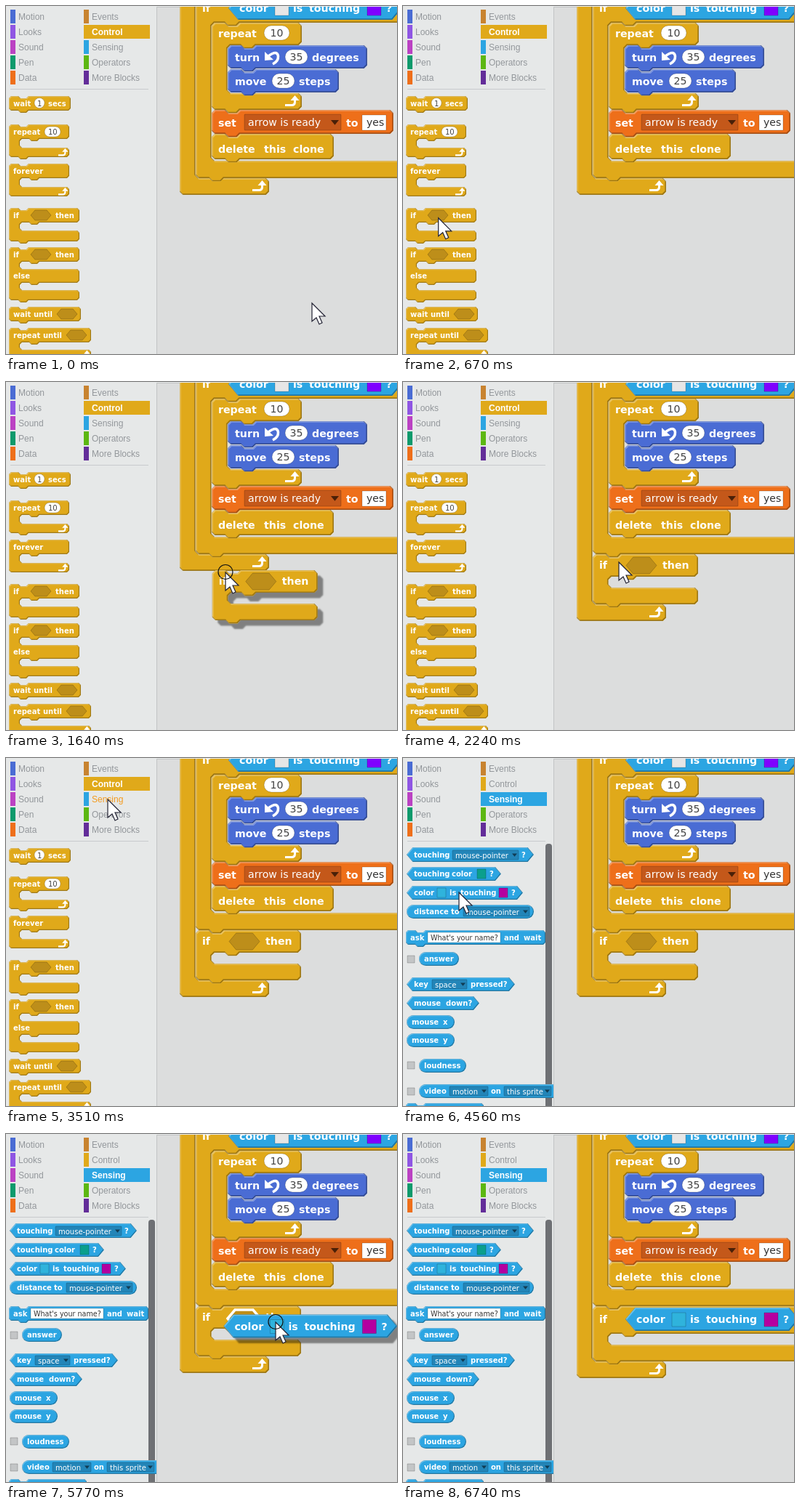
Write an HTML page with a canvas that moves like this. It is 538 px wide and 479 px high and loops after 7790 ms.

```html
<!DOCTYPE html>
<html lang="en">
<head>
<meta charset="utf-8">
<title>Block editor</title>
<style>
html, body { margin: 0; width: 100%; height: 100%; overflow: hidden; background: #e6e8e8; }
canvas { display: block; }
</style>
</head>
<body>
<canvas width="538" height="479"></canvas>
<script>
const ctx = document.querySelector('canvas').getContext('2d');
const LOOP = 7790, BIG = 1.44, DRAG_LAG = 60;
const CONTROL = '#e0a91a', SENSING = '#2ca5e2', MOTION = '#4a6cd4', DATA = '#ee6f1a';
const SLOT = '#bd8e1a', MENU = '#2385b8';

// Screen updates: [first, last, count]
const updates = [[0, 0, 1], [100, 790, 7], [910, 1640, 7], [1760, 2000, 3], [2240, 2240, 1], [2700, 3400, 7],
  [3510, 4230, 7], [4330, 4560, 3], [4810, 5530, 7], [5770, 6500, 7], [6620, 6740, 2]];
const ticks = updates.flatMap(([a, b, n]) =>
  Array.from({ length: n }, (_, i) => Math.floor((a + (b - a) * i / Math.max(1, n - 1)) / 10) * 10));

// Pointer path: [time, x, y, ease-out power on arrival (0 = smooth both ends)]
const path = [[0, 421, 409, 0], [790, 24, 284, 0], [910, 24, 284, 1], [1150, 184, 296, 1], [1640, 302, 262, 3],
  [2000, 296, 253, 0], [2240, 297, 248, 0], [2580, 297, 248, 1], [3400, 139, 56, 0], [3510, 140, 57, 1],
  [3750, 140, 57, 1], [4230, 86, 155, 0], [4560, 77, 185, 2], [4690, 77, 185, 1], [5530, 378, 267, 1.3],
  [5770, 371, 259, 2], [5890, 371, 259, 1], [6500, 412, 405, 0], [6620, 466, 451, 1]];

function pointer(t) {
  const i = path.findIndex(k => k[0] > t);
  if (i < 0) return path.at(-1).slice(1, 3);
  const [t0, x0, y0] = path[i - 1], [t1, x1, y1, power] = path[i];
  const u = (t - t0) / (t1 - t0);
  const e = power ? 1 - (1 - u) ** power : u * u * (3 - 2 * u);
  return [x0 + (x1 - x0) * e, y0 + (y1 - y0) * e];
}

function text(str, x, y, size, color = '#fff', weight = 'bold', family = '"DejaVu Sans", sans-serif') {
  ctx.font = `${weight} ${size}px ${family}`;
  ctx.fillStyle = color;
  ctx.fillText(str, x, y);
}

// Alternating words and x positions on one baseline
function words(y, s, ...list) {
  for (let i = 0; i < list.length; i += 2) text(list[i], list[i + 1], y, s === 1 ? 10 : 14.2);
}

function polygon(points) {
  const p = new Path2D();
  points.forEach(([x, y]) => p.lineTo(x, y));
  p.closePath();
  return p;
}

function round(x, y, w, h, r) {
  const p = new Path2D();
  p.roundRect(x, y, w, h, r);
  return p;
}

function hex(x, y, w, h) {
  const k = h * .42, m = y + h / 2;
  return polygon([[x, m], [x + k, y], [x + w - k, y], [x + w, m], [x + w - k, y + h], [x + k, y + h]]);
}

// Command block outline; each mouth is [top, bottom] below y
function stack(x, y, w, h, s = 1, mouths = [], armW = w, flat = false) {
  const c = 3 * s;
  const notch = (nx, ny) => [[13, 0], [16, 3], [24, 3], [27, 0]].map(([a, b]) => [nx + a * s, ny + b * s]);
  const pts = [[x, y + c], [x + c, y], ...notch(x, y)];
  let right = x + w;
  pts.push([right - c, y], [right, y + c]);
  for (const [a, b] of mouths) {
    const inner = x + 15 * s;
    pts.push([right, y + a - c], [right - c, y + a], ...notch(inner, y + a).reverse(),
      [inner + c, y + a], [inner, y + a + c], [inner, y + b - c], [inner + c, y + b]);
    right = x + armW;
    pts.push([right - c, y + b], [right, y + b + c]);
  }
  pts.push([right, y + h - c], [right - c, y + h]);
  if (!flat) pts.push(...notch(x, y + h).reverse());
  pts.push([x + c, y + h], [x, y + h - c]);
  return polygon(pts);
}

function block(shape, color, s = 1, lifted = false) {
  ctx.save();
  ctx.fillStyle = color;
  if (lifted) {
    ctx.shadowColor = 'rgba(0,0,0,.42)';
    ctx.shadowOffsetX = ctx.shadowOffsetY = 7.5;
    ctx.shadowBlur = 2;
  }
  ctx.fill(shape);
  ctx.shadowColor = 'transparent';
  ctx.clip(shape);
  ctx.lineWidth = 1.3 * s;
  for (const [d, tint] of [[.5, 'rgba(255,255,255,.3)'], [-.5, 'rgba(0,0,0,.3)']]) {
    ctx.save();
    ctx.translate(d * s, d * s);
    ctx.strokeStyle = tint;
    ctx.stroke(shape);
    ctx.restore();
  }
  ctx.restore();
}

function inset(shape, color) {
  ctx.fillStyle = color;
  ctx.fill(shape);
  ctx.strokeStyle = 'rgba(0,0,0,.2)';
  ctx.lineWidth = 1;
  ctx.stroke(shape);
}

function number(str, x, y, w, h, tx, ty, size) {
  inset(round(x, y, w, h, h / 2), '#fff');
  text(str, tx, ty, size, '#444', 'normal');
}

function triangle(x, y, w, color) {
  ctx.fillStyle = color;
  ctx.fill(polygon([[x, y], [x + w, y], [x + w / 2, y + w * .62]]));
}

function menu(str, x, y, w) {
  inset(round(x, y, w, 13, 1), MENU);
  text(str, x + 4, y + 10.5, 10, '#fff', 'normal');
  triangle(x + w - 9, y + 4.5, 7, '#103c54');
}

function loopArrow(x, y, s) {
  ctx.save();
  ctx.translate(x, y);
  ctx.scale(s / BIG, s / BIG);
  ctx.strokeStyle = ctx.fillStyle = '#fff';
  ctx.lineWidth = 3;
  ctx.stroke(new Path2D('M0 13.5H9Q13.5 13.5 13.5 9V6'));
  ctx.fill(new Path2D('M7.5 7L13.5 0L19.5 7Z'));
  ctx.restore();
}

function categories(selected, [mx, my]) {
  const names = ['Motion', 'Looks', 'Sound', 'Pen', 'Data', 'Events', 'Control', 'Sensing', 'Operators', 'More Blocks'];
  const colors = [MOTION, '#8f56e3', '#bb42c3', '#0e9a6c', DATA, '#c88330', CONTROL, SENSING, '#5cb712', '#632d99'];
  names.forEach((name, i) => {
    const x = i < 5 ? 6 : 107, y = 5 + i % 5 * 21, on = name === selected;
    const hover = mx >= x && mx < x + 91 && my >= y && my < y + 20;
    ctx.fillStyle = colors[i];
    ctx.fillRect(x, y, on ? 91 : 7, 19);
    text(name, x + 11, y + 14, 12, on ? '#fff' : hover ? '#f39a1e' : '#93979b', on ? 'bold' : 'normal',
      '"Liberation Sans", Arial, sans-serif');
  });
  ctx.fillStyle = '#c8cbcd';
  ctx.fillRect(6, 114, 190, 1);
}

function controlPalette() {
  const slot = (x, y) => inset(hex(x, y, 28, 14), SLOT);
  const put = (...args) => block(stack(4, ...args), CONTROL);
  put(124, 85, 20);
  words(138, 1, 'wait', 10, 'secs', 58);
  number('1', 39, 126.5, 14, 14, 43, 138, 10);
  put(163, 83, 45, 1, [[20, 32]]);
  words(177, 1, 'repeat', 10);
  number('10', 53, 166, 22, 14, 58, 177, 10);
  loopArrow(72, 196, 1);
  put(217, 83, 45, 1, [[20, 32]], 83, true);
  words(231, 1, 'forever', 10);
  loopArrow(72, 250, 1);
  put(278, 97, 46, 1, [[20, 31]]);
  words(292, 1, 'if', 10, 'then', 68);
  slot(34, 281);
  put(332, 97, 73, 1, [[20, 30], [49, 59]]);
  words(346, 1, 'if', 10, 'then', 68);
  words(375, 1, 'else', 10);
  slot(34, 335);
  put(414, 99, 20);
  words(428, 1, 'wait', 10, 'until', 38);
  slot(70, 417);
  put(443, 113, 45, 1, [[20, 30]]);
  words(457, 1, 'repeat', 10, 'until', 51);
  slot(83, 446);
  loopArrow(102, 474, 1);
}

function sensingPalette() {
  const put = shape => block(shape, SENSING);
  const pill = (x, y, w) => put(round(x, y, w, 19, 9.5));
  const swatch = (x, y, color) => inset(round(x, y, 12, 13, 0), color);
  const check = y => inset(round(6, y, 10, 10, 0), '#c3c5c6');
  ctx.fillStyle = '#6e7074';
  ctx.fill(round(196, 118, 9, 380, 4));

  put(hex(5, 123, 175, 20));
  words(137, 1, 'touching', 15, '?', 163);
  menu('mouse-pointer', 68, 127, 91);
  put(hex(5, 150, 130, 19));
  words(163, 1, 'touching', 15, 'color', 67, '?', 119);
  swatch(102, 153, '#0b9f8c');
  put(hex(5, 176, 160, 19));
  words(189, 1, 'color', 15, 'is', 64, 'touching', 79, '?', 149);
  swatch(47, 179, '#2fb3dc');
  swatch(132, 179, '#b400a0');
  pill(5, 202, 175);
  words(215, 1, 'distance', 15, 'to', 66);
  menu('mouse-pointer', 83, 205, 91);
  put(stack(4, 237, 192, 20));
  words(251, 1, 'ask', 10, 'and', 139, 'wait', 166);
  inset(round(34, 240, 100, 14, 0), '#fff');
  text("What's your name?", 38, 251, 9.6, '#333', 'normal');
  check(272);
  pill(22, 267, 55);
  words(280, 1, 'answer', 29);
  put(hex(5, 302, 149, 19));
  words(315, 1, 'key', 15, 'pressed?', 93);
  menu('space', 40, 305, 48);
  put(hex(5, 328, 100, 19));
  words(341, 1, 'mouse', 15, 'down?', 59);
  pill(5, 354, 66);
  words(367, 1, 'mouse', 12, 'x', 55);
  pill(5, 379, 66);
  words(392, 1, 'mouse', 12, 'y', 55);
  check(418);
  pill(22, 414, 65);
  words(427, 1, 'loudness', 29);
  check(454);
  pill(22, 449, 200);
  words(462, 1, 'video', 29, 'on', 121);
  menu('motion', 64, 452, 53);
  menu('this sprite', 139, 452, 65);
  put(stack(4, 475, 107, 20));
}

function colorTest(x, y, first, second, lifted) {
  block(hex(x, y, 239, 32), SENSING, BIG, lifted);
  words(y + 21, BIG, 'color', x + 15, 'is', x + 89, 'touching', x + 111, '?', x + 217);
  inset(round(x + 64, y + 7, 19, 19, 0), first);
  inset(round(x + 191, y + 7, 19, 19, 0), second);
}

function emptyIf(x, y, lifted) {
  block(stack(x, y, 145, 69, BIG, [[31, 46]]), CONTROL, BIG, lifted);
  words(y + 20, BIG, 'if', x + 9, 'then', x + 96);
  inset(hex(x + 46, y + 4, 42, 23), SLOT);
}

function filledIf(y, mouthBottom, h, first, second) {
  block(stack(261, y, 350, h, BIG, [[38, mouthBottom]]), CONTROL, BIG);
  words(y + 23, BIG, 'if', 270);
  colorTest(306, y + 2, first, second);
}

function script(dropped, filled) {
  const end = filled ? 313 : dropped ? 306 : 237;
  block(stack(239, -60, 350, end + 83, BIG, [[30, end + 60]], 123, true), CONTROL, BIG);
  loopArrow(339, end + 3, BIG);
  if (filled) filledIf(237, 53, 76, '#2fb3dc', '#b400a0');
  else if (dropped) emptyIf(261, 237);
  filledIf(-15, 228, 252, '#e6e6e6', '#7f00ff');

  block(stack(283, 176, 168, 35, BIG), CONTROL, BIG);
  words(202, BIG, 'delete', 292, 'this', 355, 'clone', 395);

  block(stack(283, 143, 250, 33, BIG), DATA, BIG);
  words(166, BIG, 'set', 292, 'to', 468);
  inset(round(328, 149, 133, 22, 1), '#c4581a');
  text('arrow is ready', 333, 165, 14.1, '#fff', 'normal');
  triangle(447, 157, 11, '#4a2008');
  inset(round(490, 150, 33, 21, 0), '#fff');
  text('yes', 496, 165, 14.1, '#333', 'normal');

  block(stack(283, 23, 124, 120, BIG, [[31, 97]]), CONTROL, BIG);
  words(43, BIG, 'repeat', 292);
  number('10', 355, 27, 35, 20, 363.5, 42, 14.1);
  loopArrow(384, 123, BIG);

  block(stack(305, 87, 153, 32, BIG), MOTION, BIG);
  words(109, BIG, 'move', 315, 'steps', 403);
  number('25', 366, 93, 31, 20, 372.5, 108, 14.1);
  block(stack(305, 54, 192, 32, BIG), MOTION, BIG);
  words(76, BIG, 'turn', 315, 'degrees', 421);
  number('35', 384, 60, 31, 20, 390.5, 75, 14.1);
  ctx.strokeStyle = ctx.fillStyle = '#fff';
  ctx.lineWidth = 3.5;
  ctx.stroke(new Path2D('M361 69Q373 60 374.5 69Q375 76 367 80'));
  ctx.fill(new Path2D('M356 63V75L368 74Z'));
}

function cursor(x, y, pressed) {
  const shape = polygon([[0, 0], [0, 25], [6, 20], [10, 29], [14, 27], [10, 18], [18, 18]]
    .map(([a, b]) => [x + a, y + b]));
  ctx.lineWidth = 1.2;
  ctx.strokeStyle = '#223';
  ctx.fillStyle = '#fff';
  ctx.fill(shape);
  ctx.stroke(shape);
  if (pressed) {
    ctx.strokeStyle = '#111';
    ctx.stroke(round(x - 10, y - 10.5, 20, 20, 10));
  }
}

function draw(t) {
  const now = ticks.findLast(k => k <= t);
  const during = (a, b) => now >= a && now < b;
  const at = pointer(now), [hx, hy] = pointer(Math.max(0, now - DRAG_LAG));
  const sensing = now >= 3750;

  ctx.fillStyle = '#e6e8e8';
  ctx.fillRect(0, 0, 538, 479);
  categories(sensing ? 'Sensing' : 'Control', at);
  sensing ? sensingPalette() : controlPalette();

  ctx.save();
  ctx.beginPath();
  ctx.rect(207, 1, 331, 478);
  ctx.clip();
  ctx.fillStyle = '#c2c4c5';
  ctx.fillRect(207, 1, 331, 478);
  ctx.fillStyle = '#dcdddd';
  ctx.fillRect(208, 2, 330, 477);
  script(now >= 2240, now >= 5890);
  ctx.restore();

  ctx.strokeStyle = '#fff';
  ctx.lineWidth = 3.5;
  if (during(1760, 2240)) ctx.stroke(new Path2D('M262 236H280L284 240H296L300 236H406'));
  if (during(5770, 5890)) ctx.stroke(hex(305, 242, 45, 24));
  if (during(1030, 2240)) emptyIf(hx - 18, hy - 3, true);
  if (during(4810, 5890)) colorTest(hx - 72, hy - 11, '#2fb3dc', '#b400a0', true);
  if (now < 6740) cursor(...at, during(910, 2240) || during(3630, 3750) || during(4810, 5890));
}

const start = performance.now();
function loop() {
  draw((performance.now() - start) % LOOP);
  requestAnimationFrame(loop);
}
loop();
</script>
</body>
</html>
```
